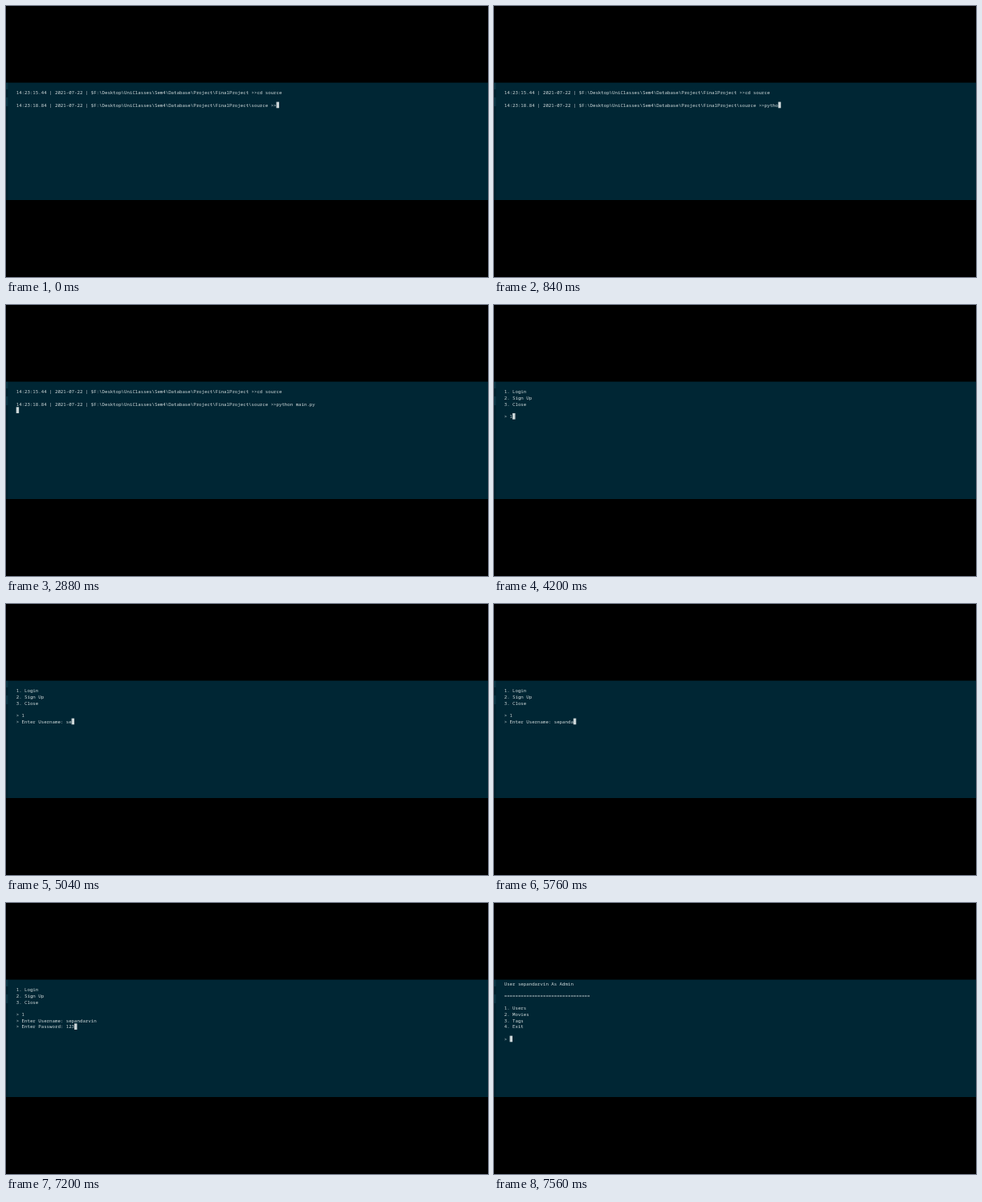
Write an HTML page with a canvas that moves like this. It is 600x338 px and loops after 8000 ms.

```html
<!DOCTYPE html>
<html lang="en">
<head>
<meta charset="utf-8">
<title>Terminal session</title>
<style>
  html, body { margin: 0; width: 100%; height: 100%; overflow: hidden; background: #000; }
  canvas { display: block; width: 600px; height: 338px; }
</style>
</head>
<body>
<canvas id="stage" width="600" height="338"></canvas>
<script>
const ctx = document.getElementById('stage').getContext('2d');
const LOOP = 8000;
const LEFT = 12.7, TOP = 96.6, CELL = 3.445, LINE = 7.67, BASE = 5.9;
const USER = 'sepandarvin';
const PATH = '2021-07-22 | $F:\\Desktop\\UniClasses\\Sem4\\Database\\Project\\FinalProject';

// Terminal output over time: '\f' clears the screen, '\n' starts a new row.
const output = [
  [0, `\f\n14:23:15.44 | ${PATH} >>cd source\n\n14:23:18.84 | ${PATH}\\source >>`],
  [120, 'p'], [360, 'y'], [480, 't'], [600, 'h'], [840, 'o'],
  [1080, 'n'], [1200, ' '], [1320, 'm'], [1440, 'a'], [1560, 'in'],
  [1920, '.'], [2160, 'p'], [2280, 'y'],
  [2760, '\n'],
  [3000, '\f\n1. Login\n2. Sign Up\n3. Close\n\n> '],
  [4200, '1'],
  [4440, '\n> Enter Username: '],
  ...typed(USER.slice(0, 4), 4920),
  ...typed(USER.slice(4), 5520),
  [6480, '\n> Enter Password: '],
  [6600, '1'], [6840, '2'], [7200, '3'], [7320, '4'],
  [7560, `\fUser ${USER} As Admin\n\n${'='.repeat(31)}\n\n` +
         '1. Users\n2. Movies\n3. Tags\n4. Exit\n\n> ']
];

function typed(word, start) {
  return [...word].map((ch, i) => [start + i * 120, ch]);
}

function screenAt(time) {
  const text = output.filter(([at]) => at <= time).map(([, s]) => s).join('');
  return text.slice(text.lastIndexOf('\f') + 1).split('\n');
}

function box(color, x, y, w, h) {
  ctx.fillStyle = color;
  ctx.fillRect(x, y, w, h);
}

function drawWindow() {
  box('#000', 0, 0, 600, 338);
  box('#002634', 0, 95.6, 600, 146.4);
  box('#00202c', 0, 95.6, 2.5, 146.4);
  box('#0a3341', 0, 96, 2.5, 8);
  box('#0a3341', 0, 114, 2.5, 11);
}

function drawText(rows) {
  ctx.font = `${CELL / 0.6}px "Noto Sans Mono", "DejaVu Sans Mono", monospace`;
  ctx.fillStyle = '#d3dcdd';
  rows.forEach((row, r) => {
    [...row].forEach((ch, c) => {
      ctx.fillText(ch, LEFT + c * CELL, TOP + r * LINE + BASE);
    });
  });
}

function drawCursor(rows) {
  const r = rows.length - 1;
  box('#cbd5d7', LEFT + rows[r].length * CELL, TOP + r * LINE, CELL, LINE);
}

function frame(now) {
  const rows = screenAt(now % LOOP);
  drawWindow();
  drawText(rows);
  drawCursor(rows);
  requestAnimationFrame(frame);
}

frame(0);
</script>
</body>
</html>
```
